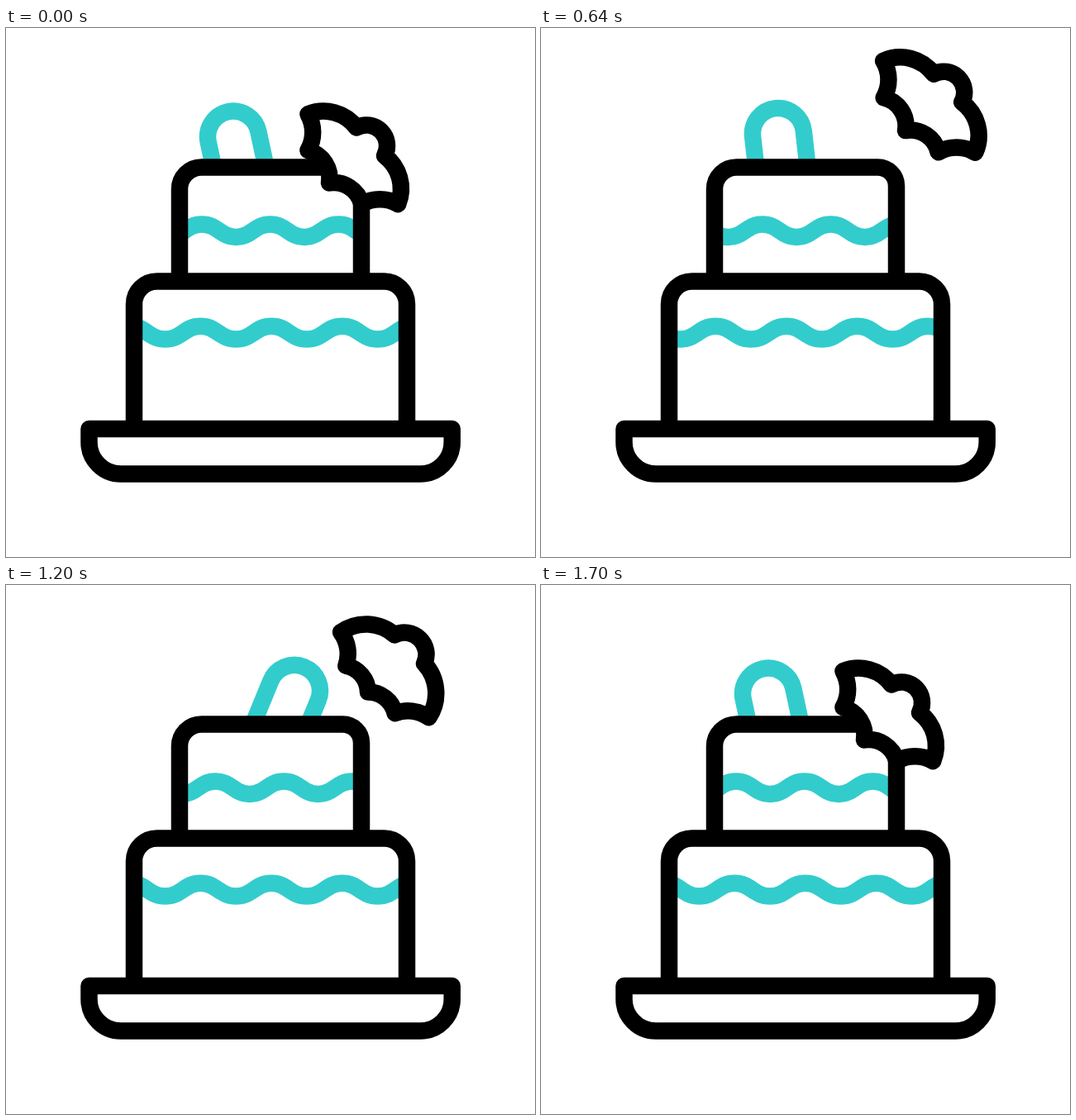
An HTML page that plays this animation: 640x640 px, repeating every 2400 ms.

```html
<!DOCTYPE html>
<html lang="en">
<head>
<meta charset="utf-8">
<title>Cake and bat</title>
<style>
  html, body { margin: 0; width: 100%; height: 100%; overflow: hidden; background: #fff; }
  svg { display: block; width: 100%; height: 100%; }
  path { fill: none; stroke: #000; stroke-width: 20.5; stroke-linejoin: round; }
  .teal { stroke: #33cccc; }
  #bat { fill: #fff; }
</style>
</head>
<body>
<svg viewBox="0 0 640 640">
  <clipPath id="aboveCake"><rect width="640" height="166"/></clipPath>
  <clipPath id="upperTier"><rect x="212" y="200" width="216" height="90"/></clipPath>
  <clipPath id="lowerTier"><rect x="157" y="320" width="326" height="90"/></clipPath>

  <g clip-path="url(#aboveCake)">
    <g id="topper">
      <path class="teal" transform="translate(318 124) rotate(8)" d="M-31 70V0A31 31 0 0 1 31 0V70"/>
    </g>
  </g>
  <g clip-path="url(#upperTier)"><path id="upperWave" class="teal"/></g>
  <g clip-path="url(#lowerTier)"><path id="lowerWave" class="teal"/></g>

  <path d="M210 306V195A26.5 26.5 0 0 1 236.5 168.5H407.5A22.5 22.5 0 0 1 430 191V306"/>
  <path d="M155 485V334A27.5 27.5 0 0 1 182.5 306.5H457.5A27.5 27.5 0 0 1 485 334V485"/>
  <path d="M100.5 485H539.7V501A38.5 38.5 0 0 1 501.2 539.5H139A38.5 38.5 0 0 1 100.5 501Z"/>
  <path id="bat"/>
</svg>
<script>
const LOOP = 2400, MOVING = 1700, STEP = 20, FLAP_TIME = 340;
const byId = id => document.getElementById(id);

const mix = (a, b, u) => a + (b - a) * u;
const smooth = u => u * u * (3 - 2 * u);
// Eased 0 to 1 between two times
const ramp = (t, from, to) => smooth(Math.min(1, Math.max(0, (t - from) / (to - from))));

// Two wing beats, then the wings stay open for landing
function flapAt(t) {
  const beat = t / FLAP_TIME;
  return beat < 4 ? smooth(1 - Math.abs(beat % 2 - 1)) : 0;
}

// Take off, sink, rise again, land
const flightAt = t =>
  91 * ramp(t, 0, 500) - 35.5 * ramp(t, 500, 940) +
  30.5 * ramp(t, 940, 1360) - 86 * ramp(t, 1360, MOVING);

// Swing right, left, right and back to rest
const swingAt = t =>
  -20.1 + 34.7 * (ramp(t, 0, 350) - ramp(t, 1220, MOVING)) -
  40.8 * (ramp(t, 350, 800) - ramp(t, 800, 1220));

// Upright bat around the middle of its neck, made of circular arcs
function drawBat(flap, flight) {
  const spread = 1 + 0.0003 * flight * (1 - flap);
  const point = (x, y) => ({ x: x * spread, y: y * spread });
  const neck = { x: mix(24, 26, flap), y: 0 };
  const tip = point(mix(77, 68.6, flap), mix(30, 57.3, flap));
  const corner = point(mix(46, 34.6, flap), mix(61, 74.2, flap));
  const tail = point(0, mix(70.7, 72, flap));

  const arc = (r, sweep, p, side = 1) => `A${r} ${r} 0 0 ${sweep} ${side * p.x} ${p.y}`;
  const head = 25 + 3 * flap, wing = 50 + 6 * flap;
  const edge = 44, scallop = 35 - 4 * flap;
  const bat = byId("bat");
  bat.setAttribute("d", `M${-neck.x} 0` + arc(head, 1, neck) +
    arc(wing, 1, tip) + arc(edge, 0, corner) + arc(scallop, 0, tail) +
    arc(scallop, 0, corner, -1) + arc(edge, 0, tip, -1) + arc(wing, 1, neck, -1) + "Z");
  bat.setAttribute("transform",
    `translate(${441 + 0.62 * flight} ${137.5 - 0.785 * flight}) rotate(${45 - 2 * flap})`);
}

function drawWave(id, crest, period, y, height) {
  const half = period / 2, pull = half * 0.46;
  const bend = dy => `c${pull} 0 ${half - pull} ${dy} ${half} ${dy}`;
  const start = crest % period - period;
  byId(id).setAttribute("d", `M${start} ${y}` + (bend(height) + bend(-height)).repeat(9));
}

function draw(t) {
  const slide = ramp(t, -55, MOVING);
  drawWave("upperWave", 236 + 4 * 82.7 * slide, 82.7, 237.4, 15.5);
  drawWave("lowerWave", 234.2 + 5 * 85.7 * slide, 85.7, 360.8, 15.7);
  byId("topper").setAttribute("transform", `rotate(${swingAt(t)} 318 249)`);
  drawBat(flapAt(t), flightAt(t));
}

const begin = performance.now();
function tick() {
  const t = (performance.now() - begin) % LOOP;
  draw(Math.min(MOVING, Math.floor(t / STEP) * STEP));
  requestAnimationFrame(tick);
}
tick();
</script>
</body>
</html>
```
